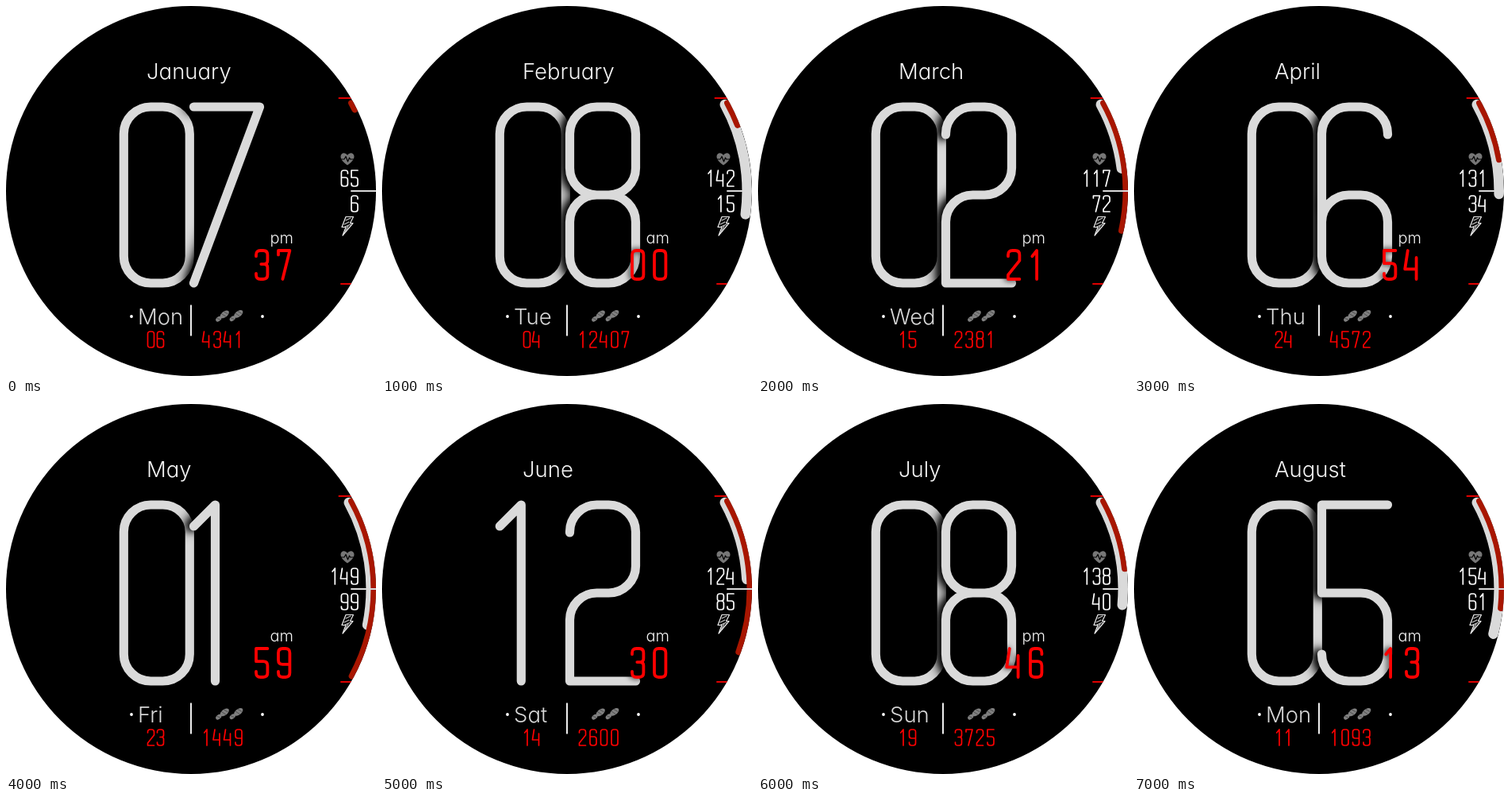
An HTML page for the animation above (8 s loop, 466x466 px).

```html
<!DOCTYPE html>
<html lang="en">
<head>
<meta charset="utf-8">
<title>Watch face</title>
<style>
  html, body { margin: 0; width: 100%; height: 100%; overflow: hidden; background: #fff; }
  svg { display: block; width: 466px; height: 466px; }
  path { fill: none; stroke-linecap: round; stroke-linejoin: round; }
  text { font-family: Inter, Lato, sans-serif; font-weight: 300; font-feature-settings: "cv11"; font-size: 27.5px; }
  .hour { stroke: #dadada; stroke-width: 11.2; }
  #units { filter: drop-shadow(-3px 0 4px #000) drop-shadow(-4px 0 7px #000); }
  #minute { stroke: #f00; stroke-width: 2.1; filter: drop-shadow(-1px 0 2px #000); }
  .small { stroke-width: 1.7; }
  .red { stroke: #f00; }
  .white { stroke: #fff; }
</style>
</head>
<body>
<svg viewBox="0 0 466 466">
  <clipPath id="dial"><circle cx="233" cy="233" r="233"/></clipPath>
  <g clip-path="url(#dial)">
    <rect width="466" height="466"/>
    <text id="month" x="177" y="92" fill="#f4f4f4"></text>

    <path id="tens" class="hour" transform="translate(148.300 127)"/>
    <g id="units"><path id="unit" class="hour" transform="translate(236.500 127)"/></g>
    <text id="half" x="332.500" y="298.500" fill="#f4f4f4" style="font-size:20px"></text>
    <path id="minute"/>

    <circle cx="158" cy="391" r="1.9" fill="#fff"/>
    <circle cx="323" cy="391" r="1.9" fill="#fff"/>
    <path d="M233 376.500V415.500" stroke="#eee" stroke-width="2" style="stroke-linecap:butt"/>
    <text id="day" x="166" y="401" fill="#d8d8d8"></text>
    <path id="date" class="small red"/>
    <path id="steps" class="small red"/>
    <g id="feet" fill="#808080"></g>

    <path d="M419.500 116H437M422 350H438" stroke="#e00000" stroke-width="2"/>
    <path id="pulseArc" stroke="#dadada" stroke-width="12.600"/>
    <path id="powerArc" stroke="#a81600" stroke-width="8"/>
    <path d="M435 233H466" stroke="#dadada" stroke-width="2"/>

    <path d="M430 200.500C424 196 421.500 193 421.500 189.500C421.500 184.500 427.500 183.500 430 188C432.500 183.500 438.500 184.500 438.500 189.500C438.500 193 436 196 430 200.500Z" style="fill:#777"/>
    <path d="M422 193H426L428 189.500L430.500 196L432.500 191L433.500 193H438" stroke="#000" stroke-width="1.2"/>
    <path id="pulse" class="small white"/>
    <path id="power" class="small white"/>
    <path d="M428 265.500H437.500L433.500 273.500H437L424 289L428 278.500H423Z" stroke="#eee" stroke-width="1.2"/>
    <path d="M428 270L434 267M426 275L432 272M427 278L434 275M427 284L431 277" stroke="#ccc" stroke-width="1.1"/>
  </g>
</svg>
<script>
const $ = id => document.getElementById(id);

// Narrow numerals on an 8 x 20 cell
const bowl = 'V17Q8 20 5 20H3Q0 20 0 17';
const narrow = [
  `M3 0H5Q8 0 8 3${bowl}V3Q0 0 3 0Z`,
  'M1.3 4L4.5 0V20',
  'M0 4V3Q0 0 3 0H5Q8 0 8 3V7L0 17V20H8',
  `M0 4V3Q0 0 3 0H5Q8 0 8 3V7Q8 9.5 5.5 9.5H3.5M5.5 9.5Q8 9.5 8 12${bowl}V16`,
  'M1 0L-1 13H7M7 5V20',
  `M8 0H0V9H5Q8 9 8 12${bowl}V16`,
  'M8 4V3Q8 0 5 0H3Q0 0 0 3V17Q0 20 3 20H5Q8 20 8 17V12Q8 9 5 9H0',
  'M0 3V0H8L3 20',
  'M3 0H5Q8 0 8 3V6Q8 9 5 9H3Q0 9 0 6V3Q0 0 3 0ZM3 9H5Q8 9 8 12V17Q8 20 5 20H3Q0 20 0 17V12Q0 9 3 9Z',
  'M0 16V17Q0 20 3 20H5Q8 20 8 17V3Q8 0 5 0H3Q0 0 0 3V8Q0 11 3 11H8'
];

// Hour numerals, centre lines on 83 x 222
const arc = (x, y, sweep = 1) => `A34 34 0 0 ${sweep} ${x} ${y}`;
const box = (a, b) =>
  `M34 ${a}H49${arc(83, a + 34)}V${b - 34}${arc(49, b)}H34${arc(0, b - 34)}V${a + 34}${arc(34, a)}Z`;
const wide = {
  0: box(0, 222),
  1: 'M0 27L27 0V222',
  2: `M0 35V34${arc(34, 0)}H49${arc(83, 34)}V77${arc(49, 111)}H34${arc(0, 145, 0)}V222H83`,
  5: `M83 0H0V111H49${arc(83, 145)}V188${arc(49, 222)}H34${arc(0, 188)}`,
  6: `M83 35V34${arc(49, 0, 0)}H34${arc(0, 34, 0)}V188${box(111, 222)}`,
  7: 'M0 0H83L0 222',
  8: box(0, 111) + box(111, 222)
};

// month, hour, minute, half, weekday, date, steps, pulse, power
const scenes = [
  ['January', '07', '37', 'pm', 'Mon', '06', '4341', 65, 6],
  ['February', '08', '00', 'am', 'Tue', '04', '12407', 142, 15],
  ['March', '02', '21', 'pm', 'Wed', '15', '2381', 117, 72],
  ['April', '06', '54', 'pm', 'Thu', '24', '4572', 131, 34],
  ['May', '01', '59', 'am', 'Fri', '23', '1449', 149, 99],
  ['June', '12', '30', 'am', 'Sat', '14', '2600', 124, 85],
  ['July', '08', '46', 'pm', 'Sun', '19', '3725', 138, 40],
  ['August', '05', '13', 'am', 'Mon', '11', '1093', 154, 61]
];

function number(id, value, x, y, pitch, scale = 1) {
  const step = pitch / scale;
  const d = [...String(value)].map((n, i) =>
    narrow[n].replace(/([MLHVQZ])([^MLHVQZ]*)/g, (_, cmd, args) => {
      const nums = args.trim().split(/\s+/).filter(Boolean).map(Number);
      const moved = nums.map((v, k) => cmd !== 'V' && k % 2 === 0 ? v + i * step : v);
      return cmd + moved.join(' ');
    })).join('');
  $(id).setAttribute('d', d);
  $(id).setAttribute('transform', `translate(${x} ${y}) scale(${scale})`);
}

const rightAligned = (id, value, y) =>
  number(id, value, 435 - (String(value).length - 1) * 12.6, y, 12.6);

function gauge(id, r, end) {
  const at = deg => {
    const a = deg * Math.PI / 180;
    return `${233 + r * Math.cos(a)} ${233 + r * Math.sin(a)}`;
  };
  $(id).setAttribute('d', end > -30 ? `M${at(-28.7)}A${r} ${r} 0 0 1 ${at(Math.max(end, -28.6))}` : '');
}

function show([month, hour, minute, half, day, date, steps, pulse, power]) {
  Object.entries({ month, half, day }).forEach(([id, s]) => $(id).textContent = s);
  $('tens').setAttribute('d', wide[hour[0]]);
  $('unit').setAttribute('d', wide[hour[1]]);
  number('minute', minute, 315, 308, 28, 1.8);
  number('date', date, 178.5, 410, 12);
  number('steps', steps, 248.5, 410, 13.5);
  rightAligned('pulse', pulse, 207);
  rightAligned('power', power, 239);
  gauge('pulseArc', 226.7, -30 + (pulse - 78) * 0.585);
  gauge('powerArc', 230.4, -30 + power * 0.59);
}

const foot = (x, y) => `<g transform="translate(${x} ${y}) rotate(-38)">
  <ellipse cx="3.500" rx="6.500" ry="3.700"/><ellipse cx="-6" rx="4" ry="2.700"/>
  <path d="M-7 -2L-5 2M1 -3L3 3M5 -3L7 2" stroke="#333" stroke-width=".6"/></g>`;
$('feet').innerHTML = foot(272.5, 390.5) + foot(290, 390);

const start = performance.now();
let current = -1;
function tick() {
  const i = Math.floor((performance.now() - start) / 1000) % scenes.length;
  if (i !== current) show(scenes[current = i]);
  requestAnimationFrame(tick);
}
tick();
</script>
</body>
</html>
```
